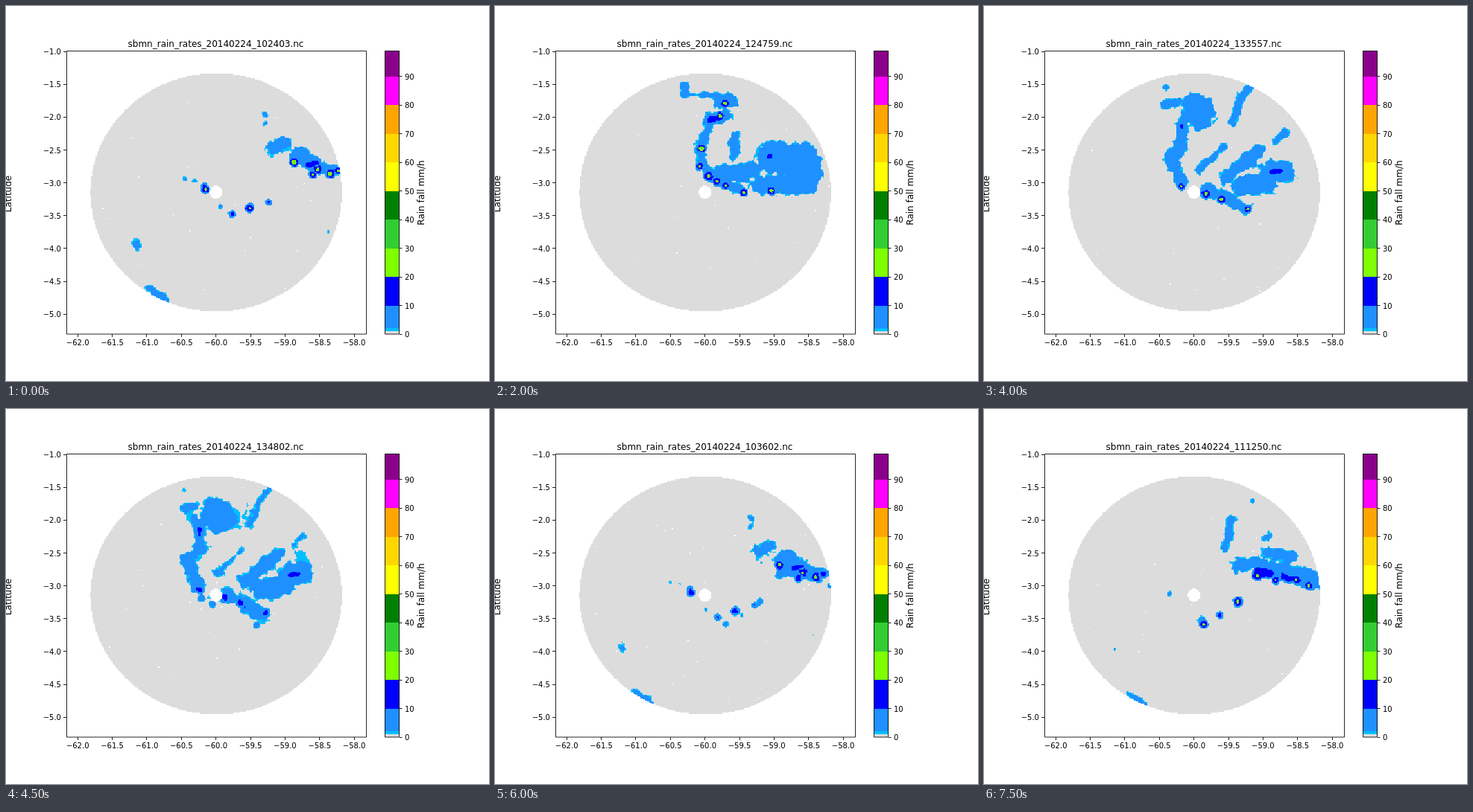
Animation, 648 px wide and 504 px high, one loop 8 s. Source, as an HTML page with a canvas:

```html
<!DOCTYPE html>
<html lang="en">
<head>
<meta charset="utf-8">
<title>Rain rates</title>
<style>
  html, body { margin: 0; width: 648px; height: 504px; overflow: hidden; background: #fff; }
  canvas, svg { position: absolute; left: 0; top: 0; }
  text { font: 10px "DejaVu Sans", sans-serif; }
  .big { font-size: 12px; text-anchor: middle; }
  .line { fill: none; stroke: #000; stroke-opacity: .85; }
</style>
</head>
<body>
<canvas id="radar" width="648" height="504"></canvas>
<svg id="chart" width="648" height="504"></svg>
<script>
const colors = ['#dcdcdc', '#00bfff', '#1e90ff', '#0000ff', '#7fff00', '#32cd32',
  '#008000', '#ffff00', '#ffd700', '#ffa500', '#ff00ff', '#8b008b'];
const stamps = ['102403', '112404', '120001', '123558', '124759', '130003', '131202', '132401',
  '133557', '134802', '140001', '141204', '103602', '142357', '104802', '111250'];
const STEP = 500, CELL = 1.5, DRIFT = -0.4; // ms, px, px per minute
const CX = 282, CY = 250.5, RX = 168.3, RY = 159.7, HOLE = 8.5;

const minutes = s => +s.slice(0, 2) * 60 + +s.slice(2, 4) + s.slice(4) / 60;
const levelOf = v => v < 1 ? 0 : v < 2 ? 1 : 2 + Math.floor(v / 10);
const floorOf = k => k < 3 ? k : Math.min(99, (k - 2) * 10);

// A stroke is a radius and the points of its spine; peaks are points.
const toSpine = ([r, ...p]) => {
  const segments = [];
  for (let i = 0; i < Math.max(1, p.length - 2); i += 2) {
    const x = p[i], y = p[i + 1], dx = (p[i + 2] ?? x) - x, dy = (p[i + 3] ?? y) - y;
    segments.push({ x, y, dx, dy, len2: dx * dx + dy * dy || 1 });
  }
  return { r, segments };
};
const scans = [];
function scan(stamp, rain, cores, peaks) {
  scans.push({
    time: minutes(stamp), seed: scans.length + 1,
    rain: rain.map(toSpine), cores: cores.map(toSpine),
    peaks: peaks.map((p, i) => toSpine([i % 2 ? 1.6 : 2.5, ...p]))
  });
}

scan('102403', [
  [10, 357, 191, 373, 185], [11, 391, 200, 416, 212], [6, 425, 217, 444, 219],
  [4, 347, 146], [3, 347, 157], [4, 240, 232], [4, 252, 234], [3, 287, 269],
  [7, 174, 321], [5, 192, 380, 214, 395], [2, 432, 303]
], [[3, 405, 212, 416, 211], [2, 303, 279], [2, 352, 263], [2, 266, 241]],
[[386, 209], [445, 221], [417, 219], [411, 226], [435, 225], [267, 246], [326, 271]]);

scan('111250', [
  [6, 333, 148, 322, 187], [3, 360, 123], [6, 379, 171], [9, 379, 193, 410, 199],
  [9, 340, 209, 362, 205, 395, 216], [13, 400, 219, 440, 230], [5, 290, 281],
  [3, 249, 248], [2, 175, 322], [4, 192, 382, 215, 396]
], [[5, 367, 219, 383, 219], [4, 402, 225, 420, 229], [2, 316, 277]],
[[366, 224], [391, 230], [435, 237], [418, 229], [340, 258], [294, 289]]);

scan('124759', [
  [8, 255, 110], [4, 250, 119, 300, 119], [10, 302, 126, 316, 127], [9, 308, 146, 285, 155],
  [7, 286, 163, 275, 185, 275, 208, 293, 230, 328, 246], [7, 322, 175, 318, 202],
  [13, 305, 226, 345, 222], [23, 372, 203, 412, 207], [14, 425, 210, 420, 238, 355, 240]
], [[4, 288, 154, 302, 147], [3, 368, 202]],
[[308, 130], [274, 215], [301, 147], [297, 235], [276, 191], [333, 250], [286, 228], [309, 241], [370, 248]]);

scan('131202', [
  [6, 244, 122, 262, 124], [12, 286, 127, 303, 128, 305, 155],
  [8, 275, 165, 268, 185, 262, 208, 273, 225, 295, 243], [6, 356, 111, 328, 168, 312, 202],
  [13, 330, 225, 370, 192], [15, 398, 180, 412, 212], [14, 350, 240, 405, 238], [8, 315, 248, 355, 258]
], [[5, 289, 128, 299, 133], [3, 278, 156, 302, 151], [3, 357, 247, 377, 237]],
[[287, 239], [288, 128], [300, 250], [294, 151], [270, 190], [338, 251], [322, 246]]);

scan('133557', [
  [4, 244, 109], [5, 241, 132, 260, 128], [21, 286, 136, 288, 145],
  [9, 266, 157, 262, 190, 250, 205, 264, 236], [5, 288, 220, 320, 190],
  [6, 356, 107, 345, 125, 333, 155], [6, 391, 181, 405, 169], [11, 325, 230, 366, 195],
  [16, 385, 222, 402, 222], [15, 345, 240, 380, 238], [9, 300, 245, 322, 258, 350, 270]
], [[3, 265, 161], [4, 294, 250], [3, 385, 222, 396, 221]],
[[297, 252], [264, 242], [318, 260], [353, 272]]);

scan('141204', [
  [5, 242, 104], [7, 340, 136], [11, 236, 142, 247, 162], [21, 272, 146, 293, 147],
  [9, 313, 125, 310, 145], [6, 250, 188, 275, 182], [8, 230, 198, 235, 225, 255, 250, 290, 260],
  [6, 262, 215, 300, 228], [8, 312, 238, 362, 192], [15, 383, 198, 390, 215],
  [15, 340, 248, 372, 222], [11, 312, 272, 335, 283]
], [[4, 243, 146, 249, 168], [2, 266, 147], [3, 320, 278, 336, 279]],
[[242, 241], [228, 199], [252, 254], [326, 290], [310, 267], [267, 262]]);

function hash(x, y, seed) {
  const h = Math.sin(x * 127.1 + y * 311.7 + seed * 74.7) * 43758.5453;
  return h - Math.floor(h);
}

function noise(x, y, seed) {
  const i = Math.floor(x), j = Math.floor(y), u = x - i, v = y - j;
  const row = k => hash(i, k, seed) * (1 - u) + hash(i + 1, k, seed) * u;
  return 2 * (row(j) * (1 - v) + row(j + 1) * v) - 1;
}

function distance(segments, x, y) {
  let best = Infinity;
  for (const s of segments) {
    const px = x - s.x, py = y - s.y;
    const t = Math.max(0, Math.min(1, (px * s.dx + py * s.dy) / s.len2));
    const ex = px - t * s.dx, ey = py - t * s.dy;
    best = Math.min(best, ex * ex + ey * ey);
  }
  return Math.sqrt(best);
}

// Rain rate in mm/h: ragged strokes with steep cores and peaks
function rate(field, x, y) {
  const n = .8 * noise(x / 8, y / 8, field.seed) + .7 * noise(x / 3.5, y / 3.5, field.seed + 50);
  let v = -2;
  const add = (list, base, slope, cap, rough) => {
    for (const { r, segments } of list) {
      const depth = r - distance(segments, x, y) + Math.min(rough, r * .55) * n;
      v = Math.max(v, Math.min(cap, base + slope * depth));
    }
  };
  add(field.rain, 1, .8, 8, 4.5);
  add(field.cores, 10, 3, 18, 2.5);
  add(field.peaks, 20, 4, 55, 2.5);
  return v;
}

const ctx = radar.getContext('2d');

function drawRadar(stamp) {
  const time = minutes(stamp);
  const found = scans.findIndex(s => s.time >= time);
  const next = found < 0 ? scans.length - 1 : found;
  const a = scans[Math.max(0, next - 1)], b = scans[next];
  const mix = a === b ? 1 : Math.min(1, (time - a.time) / (b.time - a.time));
  const shiftA = DRIFT * (time - a.time), shiftB = DRIFT * (time - b.time);
  ctx.clearRect(0, 0, 648, 504);
  for (let y = 90; y < 412; y += CELL) {
    for (let x = 113; x < 452; x += CELL) {
      const dx = x + CELL / 2 - CX, dy = y + CELL / 2 - CY;
      if ((dx / RX) ** 2 + (dy / RY) ** 2 > 1) continue;
      let fill = '#fff';
      if (Math.hypot(dx, dy) > HOLE) {
        let v = rate(b, x - shiftB, y) * mix;
        if (mix < 1) v += rate(a, x - shiftA, y) * (1 - mix);
        const k = levelOf(v);
        if (k || hash(x, y, time) > .0006) fill = colors[k];
      }
      ctx.fillStyle = fill;
      ctx.fillRect(Math.floor(x), Math.floor(y), 2, 2);
    }
  }
}

function drawChart() {
  const out = [], snap = v => Math.floor(v) + .5;
  const line = d => out.push(`<path class="line" d="${d}"/>`);
  const text = (x, y, s, attr) => out.push(`<text x="${x}" y="${y}" ${attr}>${s}</text>`);
  const degrees = v => '\u2212' + v.toFixed(1);
  const barY = v => 441 - v * 381 / 99;

  colors.forEach((c, k) => {
    const top = Math.round(barY(floorOf(k + 1))), bottom = Math.round(barY(floorOf(k)));
    out.push(`<rect x="508" y="${top}" width="20" height="${bottom - top}" fill="${c}"/>`);
  });
  line('M81.5 60.5H483.5V441H81.5ZM508.5 60.5H527.5V441H508.5Z');
  for (let k = 0; k < 9; k++) {
    const x = 96.2 + 46.37 * k, y = 61.2 + 44.13 * k;
    line(`M${snap(x)} 441v4M81 ${snap(y)}h-4`);
    text(x, 456, degrees(62 - k / 2), 'text-anchor="middle"');
    text(74, y + 4, degrees(1 + k / 2), 'text-anchor="end"');
  }
  for (let v = 0; v < 100; v += 10) {
    line(`M528 ${snap(barY(v))}h3.5`);
    text(535, barY(v) + 4, v, '');
  }
  text(0, 0, 'Latitude', 'class="big" transform="translate(7 252.5) rotate(-90)"');
  text(0, 0, 'Rain fall mm/h', 'class="big" transform="translate(561 251) rotate(-90)"');
  text(281.5, 55, '', 'class="big" id="heading"');
  chart.innerHTML = out.join('');
}

let shown = -1;
function tick() {
  const i = Math.floor(performance.now() / STEP) % stamps.length;
  if (i !== shown) {
    shown = i;
    drawRadar(stamps[i]);
    heading.textContent = `sbmn_rain_rates_20140224_${stamps[i]}.nc`;
  }
  requestAnimationFrame(tick);
}

drawChart();
tick();
</script>
</body>
</html>
```
